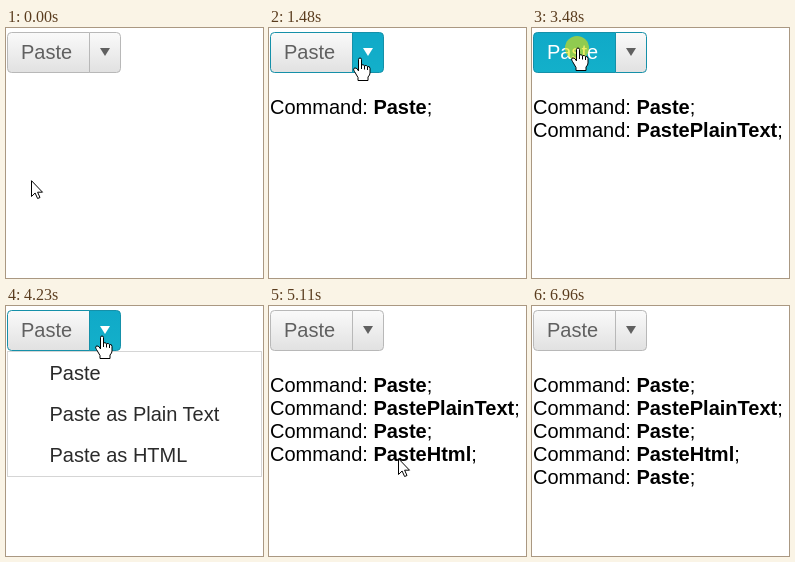
Animation, 257 px wide and 250 px high, one loop 7090 ms. Source, as an HTML page:

```html
<!DOCTYPE html>
<html lang="en">
<head>
<meta charset="utf-8">
<title>Split button</title>
<style>
  html, body { margin: 0; overflow: hidden; background: #fff; }
  svg { display: block; font: 20px "Liberation Sans", Arial, sans-serif; }
  .part { fill: url(#plain); stroke: #b8b8b8; }
  .face { fill: #606060; }
  .near .part { stroke: #1590a9; }
  .hot .part { fill: url(#teal); }
  .hot .face { fill: #fff; }
  .row { fill: #fff; }
  .row.on { fill: #bbeef7; }
  #menu text { fill: #2b2b2b; }
  #arrow, #hand { fill: #fff; stroke: #000; stroke-linejoin: round; }
</style>
</head>
<body>
<svg width="257" height="250" viewBox="0 0 257 250">
  <defs>
    <linearGradient id="plain" x2="0" y2="1">
      <stop stop-color="#fafafa"/><stop offset="1" stop-color="#e1e1e1"/>
    </linearGradient>
    <linearGradient id="teal" x2="0" y2="1">
      <stop stop-color="#10a9c8"/><stop offset="1" stop-color="#13b0ca"/>
    </linearGradient>
    <clipPath id="below"><path d="M0 45H257V250H0z"/></clipPath>
  </defs>
  <g id="log"></g>
  <g id="button">
    <g id="main">
      <path class="part" d="M83.5 4.5h-78q-4 0-4 4v32q0 4 4 4h78z"/>
      <text class="face" x="15" y="31">Paste</text>
    </g>
    <g id="drop">
      <path class="part" d="M83.5 4.5h27q4 0 4 4v32q0 4-4 4h-27z"/>
      <path class="face" d="M94 20h10l-5 8z"/>
    </g>
  </g>
  <g clip-path="url(#below)"><g id="menu">
    <rect x="1.5" y="45.5" width="254" height="125" fill="#fff" stroke="#d5d5d5"/>
  </g></g>
  <circle id="click" r="12" fill="#e6e100" opacity=".6"/>
  <g id="arrow"><path d="M.5.7v15.8l3.6-3.5 2.5 5.5 2.4-1-2.4-5.3h4.9z"/></g>
  <g id="hand"><path d="M-.5 1.5a1.5 1.5 0 0 1 3 0V7q1.5-1 3 .7 2-.8 3 .8 2.5-.5 2.5 2V15q0 2-2 4v3.5h-10v-3l-3.5-6q-2-3 .5-3.6 2 0 3.5 3zM2.5 7v4m3-3v3.5m3-2.5v3"/></g>
</svg>
<script>
const $ = id => document.getElementById(id);
const LOOP = 7090, TICKS = 57;   // the screen refreshes about every 124 ms
const ROW = 41, LINE = 23;

// Pointer stops; those with an action are clicked after arrival
const stops = [
  { at: 0, x: 25, y: 152 },
  { at: 3, x: 115, y: 96 },
  { at: 6, x: 50, y: 24, action: "Paste" },
  { at: 12, x: 90, y: 30, action: "open" },
  { at: 18, x: 145, y: 103 },
  { at: 20, x: 146, y: 108, action: "PastePlainText" },
  { at: 27, x: 45, y: 20, action: "Paste" },
  { at: 31, x: 95, y: 30, action: "open" },
  { at: 37, x: 120, y: 136 },
  { at: 38, x: 129, y: 152, action: "PasteHtml" },
  { at: 45, x: 63, y: 31, action: "Paste" },
  { at: 49, x: 106, y: 68 },
  { at: 55, x: 207, y: 247 }
];
const REST = 3;   // ticks from arrival until a click has taken effect
const clicks = stops.filter(s => s.action);
const commands = clicks.filter(s => s.action !== "open");

$("log").innerHTML = commands.map(({ action }, i) =>
  `<text x="1" y="${86 + LINE * i}">Command: <tspan font-weight="bold">${action}</tspan>;</text>`).join("");
$("menu").innerHTML += ["Paste", "Paste as Plain Text", "Paste as HTML"].map((label, i) =>
  `<rect class="row" x="2" y="${47 + ROW * i}" width="253" height="${ROW}"/>
   <text x="43.5" y="${74 + ROW * i}">${label}</text>`).join("");
const lines = [...$("log").children];
const rows = [...document.querySelectorAll(".row")];

const clamp = v => Math.max(0, Math.min(1, v));
const show = (el, on) => el.style.display = on ? "" : "none";
const move = (el, x, y) => el.setAttribute("transform", `translate(${x} ${y})`);

function pointerAt(tick) {
  const i = stops.findLastIndex(s => s.at <= tick);
  const from = stops[i], to = stops[i + 1] || from;
  const leave = from.at + (from.action ? REST : 0);
  const k = clamp((tick - leave) / (to.at - leave || 1));
  const mix = axis => Math.round(from[axis] + (to[axis] - from[axis]) * k);
  return [mix("x"), mix("y")];
}

// 0 = closed, 1 = open; the last click decides which way the menu slides
function menuAt(tick) {
  const i = clicks.findLastIndex(s => s.at < tick);
  const done = clamp((tick - clicks[i]?.at - 1) / 2);
  if (clicks[i]?.action === "open") return done;
  return clicks[i - 1]?.action === "open" ? 1 - done : 0;
}

function draw(tick) {
  const [x, y] = pointerAt(tick);
  const visible = tick === 0 || tick >= stops[1].at && tick <= stops.at(-1).at;
  const over = visible && y > 4 && y < 45 && x < 115;
  const menu = menuAt(tick);
  const onHand = over || menu > 0;

  $("button").classList.toggle("near", over);
  $("main").classList.toggle("hot", over && x < 83);
  $("drop").classList.toggle("hot", over && x >= 83);

  show($("menu"), menu > 0);
  move($("menu"), 0, (menu - 1) * 126);
  rows.forEach((row, i) => row.classList.toggle("on", Math.floor((y - 47) / ROW) === i));
  lines.forEach((line, i) => show(line, tick >= commands[i].at + REST));

  show($("click"), clicks.some(s => tick > s.at && tick < s.at + REST));
  show($("hand"), visible && onHand);
  show($("arrow"), visible && !onHand);
  for (const id of ["click", "hand", "arrow"]) move($(id), x, y);
}

function frame() {
  const time = performance.now() % LOOP;
  draw(Math.min(TICKS - 1, Math.floor((time + 15) * TICKS / LOOP)));
  requestAnimationFrame(frame);
}
frame();
</script>
</body>
</html>
```
